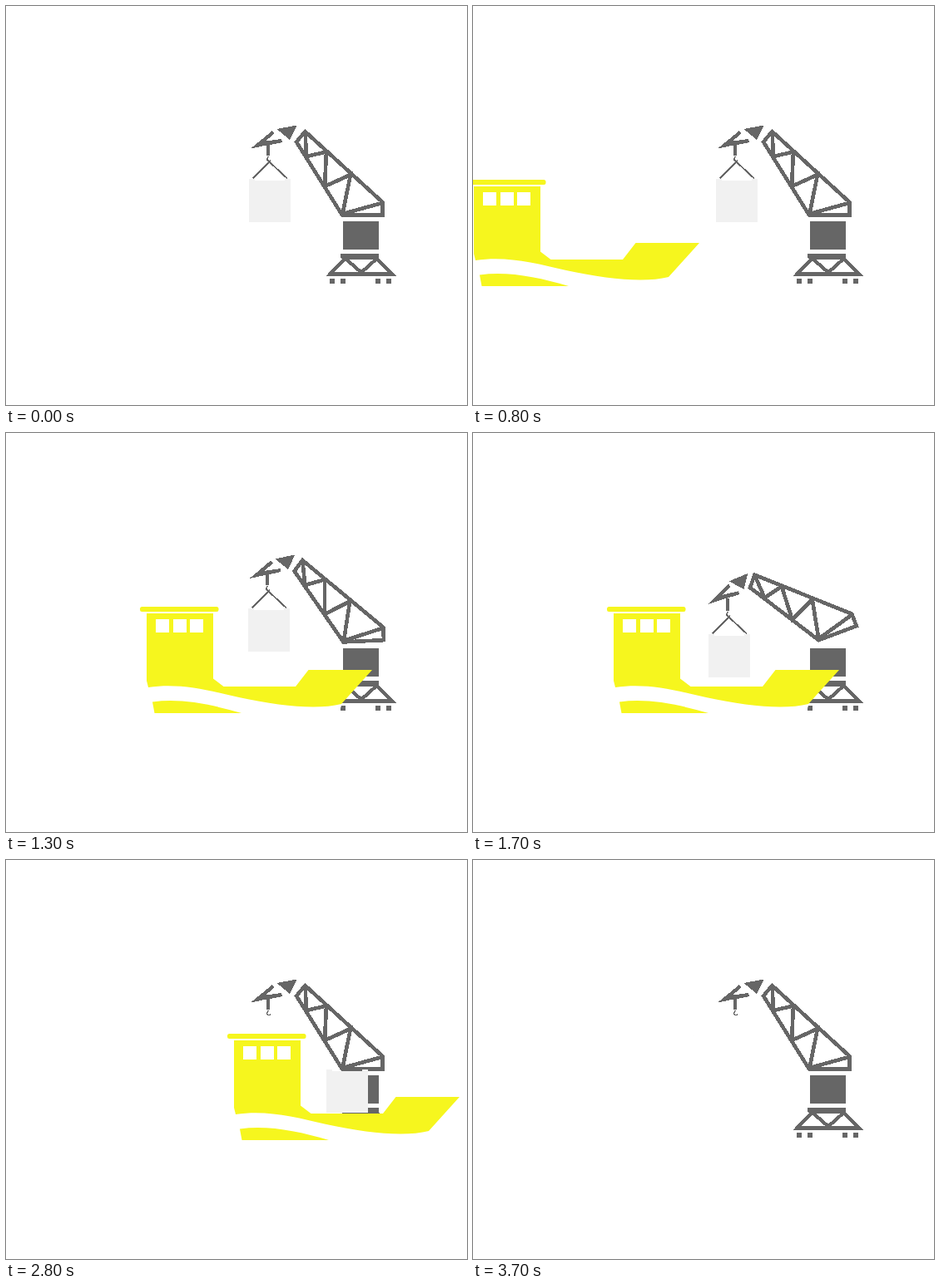
These frames come from a looping animation (554x480 px, 3800 ms). An HTML page:

```html
<!DOCTYPE html>
<html lang="en">
<head>
<meta charset="utf-8">
<title>Harbour crane</title>
<style>
  html, body { margin: 0; width: 100%; height: 100%; overflow: hidden; background: #fff; }
  svg { display: block; width: 100vw; height: 100vh; }
  .iron, .bars, .wire { shape-rendering: crispEdges; }
  .iron { fill: #666; }
  .bars { fill: none; stroke: #666; stroke-width: 4.6; }
  .wire { fill: none; stroke: #666; stroke-width: 1.9; }
  .paint { fill: #f6f61e; }
  .cargo { fill: #f1f1f1; }
  .blank { fill: #fff; }
</style>
</head>
<body>
<svg viewBox="0 0 554 480">
  <!-- crane base -->
  <path class="iron" d="M405 259h43v34h-43zM402 298h46v5l-2 2h-42l-2-2zM384 325l5-5h75l5 5zM389 328h6v6h-6zM402 328h6v6h-6zM444 328h6v6h-6zM457 328h6v6h-6z"/>
  <path class="bars" style="stroke-width:4.2" d="M387.500 323.500L408 304L427 320.500L445.500 304L465.500 323.500"/>

  <g id="jib" class="bars">
    <path d="M359.500 151L349 163.500L404 251.500H452.500V236Z"/>
    <path d="M359.500 151L361 181L385 175.500L383 217L414 203L404.500 250L452 237"/>
  </g>
  <path id="head" class="iron" d="M325.500 148L349.500 143.500L341 161Z"/>
  <path id="nose" class="iron" d="M294 171.500L320 150L322.500 153.500L312 162.500L331 160L332 164L317 167L313 167.500Z"/>
  <g id="hook">
    <path class="iron" d="M313 165h4v15h-4z"/>
    <path class="wire" style="stroke-width:1.3" d="M316 181c-3 1.500-3 5-.5 5.300c1.500 .2 2.500-.3 2.800-1.800"/>
  </g>

  <g id="load">
    <path class="cargo" d="M292 208h7v2h36v-2h7v52h-50z"/>
    <path id="ropes" class="wire" d="M296.500 207.500L316.500 187.500L338 207.500M316.500 188l-2.500-3.500"/>
  </g>

  <g id="ship">
    <path class="blank" d="M171 305L176.500 325L179 337H400L404 325L360 310L200 300Z"/>
    <path class="paint" fill-rule="evenodd" d="M169 217H249V295.500L261.500 305H348L363.500 285H440L403 326C375 333 330 329 280 318C242 309 208 300.500 171 306L169 298ZM180 224v16h16v-16zM201 224v16h16v-16zM221 224v16h16v-16z"/>
    <path class="paint" d="M176 323.500C210 319 245 326 283 337H178.500Z"/>
    <rect class="paint" x="161" y="209" width="94.500" height="6" rx="2.500"/>
  </g>
</svg>
<script>
  const STEP = 100, COUNT = 38;
  const el = id => document.getElementById(id);
  const [jib, head, nose, hook, load, ropes, ship] =
    ["jib", "head", "nose", "hook", "load", "ropes", "ship"].map(el);
  const clamp = v => Math.min(1, Math.max(0, v));
  const put = (node, x, y, turn = 0, cx = 0, cy = 0) =>
    node.setAttribute("transform", `translate(${x} ${y}) rotate(${turn} ${cx} ${cy})`);

  // ship arrives, waits for the cargo, then leaves
  const shipX = k => Math.floor(Math.min(0, 37.5 * (k - 12) - 18) + Math.max(0, 35.1 * (k - 25)));
  // 0 = jib raised, 1 = jib lowered
  const lowered = k => k <= 18 ? clamp((k - 12.4) / 5.6) : clamp((25 - k) * 0.178);

  function draw(k) {
    const p = lowered(k), q = p * p, sx = shipX(k);
    const dx = Math.round(-9 * p - 3 * q), dy = Math.round(27 * p + 17 * q);
    const held = k <= 18;
    put(jib, 0, p, -25 * p, 401, 218.5);
    put(head, -18.5 * p - 3.5 * q, 29 * p + 5.5 * q, -14.6 * p, 338.7, 151);
    put(nose, -14.2 * p, 30 * p + 11 * q, -7.5 * p, 314, 165);
    put(hook, dx, dy);
    put(ship, sx, 0);
    put(load, held ? dx : sx - 12, held ? dy : 44);
    ropes.style.display = held ? "" : "none";
  }

  const start = performance.now();
  function tick() {
    draw(Math.floor((performance.now() - start) / STEP) % COUNT);
    requestAnimationFrame(tick);
  }
  draw(0);
  requestAnimationFrame(tick);
</script>
</body>
</html>
```
